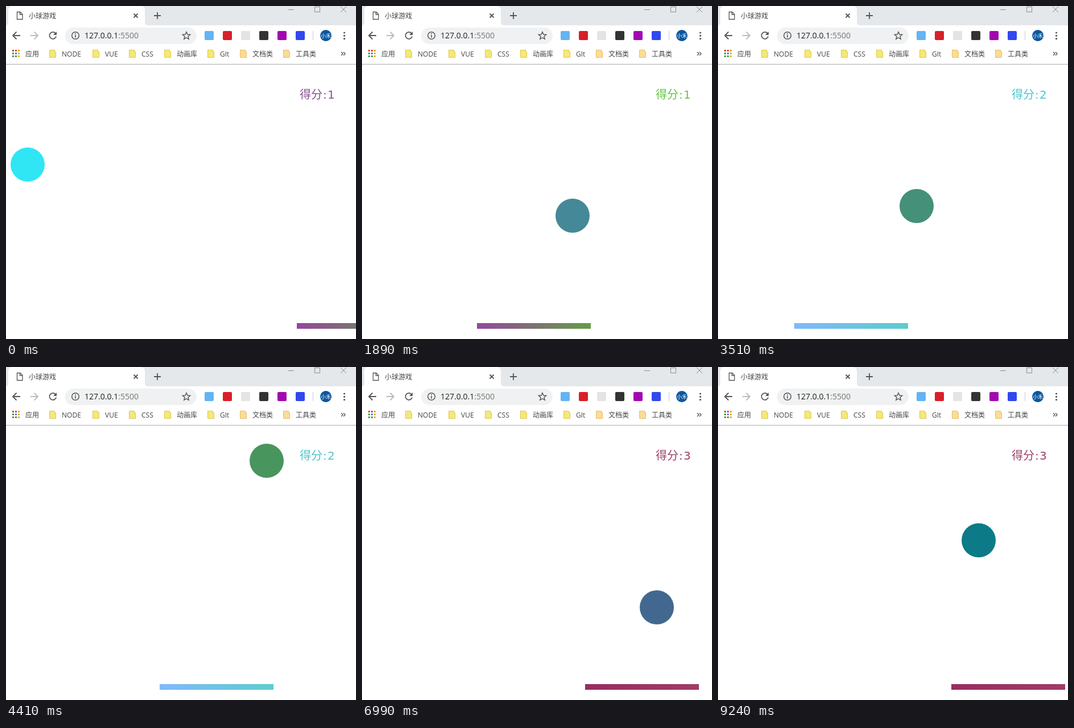
An HTML page that plays this animation: 615 px wide and 586 px high, repeating every 9270 ms.

```html
<!DOCTYPE html>
<html lang="zh-CN">
<head>
<meta charset="utf-8">
<title>小球游戏</title>
<style>
  html, body { margin: 0; width: 100%; height: 100%; overflow: hidden; background: #fff; }
  svg { display: block; width: 615px; height: 586px; }
  text { font-family: "Open Sans", "Noto Sans CJK SC", "Noto Sans CJK", sans-serif; font-size: 12px; fill: #444; }
  .line { fill: none; stroke: #555; stroke-width: 1.8; }
  .thin { fill: none; stroke: #8b8d8f; stroke-width: 1; }
  .score { font-family: "DejaVu Sans", "Noto Sans CJK SC", "Noto Sans CJK", sans-serif; font-size: 20px; }
</style>
</head>
<body>
<svg viewBox="0 0 615 586">
  <defs>
    <linearGradient id="paint"><stop id="from"/><stop id="to" offset="1"/></linearGradient>
    <clipPath id="page"><rect y="103" width="615" height="466"/></clipPath>
  </defs>
  <rect width="615" height="586" fill="#fff"/>

  <g clip-path="url(#page)">
    <rect id="paddle" y="558" width="200" height="10" fill="url(#paint)"/>
    <text id="score" class="score" y="163"><tspan x="516">得分</tspan><tspan x="557">:</tspan><tspan id="points" x="565"></tspan></text>
    <circle id="ball" r="30"/>
  </g>

  <!-- tab strip -->
  <rect width="615" height="34" fill="#e4e8eb"/>
  <path d="M0 34Q4 34 4 28V8Q4 0 12 0H236Q244 0 244 8V28Q244 34 250 34Z" fill="#fff"/>
  <path class="line" style="stroke-width:1.3" d="M19.5 10.5h5.5l4 4v9h-9.5zM24.5 10.5v4.5h4.5"/>
  <text x="40" y="21.5" fill="#555">小球游戏</text>
  <path class="line" d="M224.500 13.500l7 7m0-7l-7 7M260 17h12m-6-6v12"/>
  <path class="thin" d="M496 6.500h10M542.500 1.500h9v9h-9zM588 1l10 10m0-10l-10 10"/>

  <!-- toolbar -->
  <path class="line" d="M25 52H12m6.500-6.500L12 52l6.500 6.500"/>
  <path class="line" style="stroke:#bbb" d="M43 52h13m-6.500-6.500L56 52l-6.500 6.500"/>
  <path class="line" d="M87 48a6 6 0 1 0 1.200 5.500"/>
  <path d="M89 45v6h-6z" fill="#555"/>
  <rect x="104" y="38" width="231" height="29" rx="14.500" fill="#eff1f2"/>
  <circle class="line" cx="122" cy="52" r="6.300" style="stroke-width:1.500"/>
  <path class="line" d="M122 51v4.500M122 48v1.800" style="stroke-width:1.600"/>
  <text x="138" y="57" style="font-size:14px;fill:#222">127.0.0.1<tspan fill="#777">:5500</tspan></text>
  <path class="line" style="stroke-width:1.400" d="M317 45.500l1.900 4.500 4.800.4-3.700 3.100 1.200 4.700-4.200-2.500-4.200 2.500 1.200-4.700-3.700-3.100 4.800-.4z"/>
  <g id="extensions"></g>
  <path d="M539.500 44v16" stroke="#ccc"/>
  <circle cx="562" cy="52" r="10" fill="#0b57a0"/>
  <text x="562" y="55.500" text-anchor="middle" style="font-size:9px;fill:#fff">小禾</text>
  <g fill="#555"><circle cx="594.500" cy="47" r="1.600"/><circle cx="594.500" cy="52.300" r="1.600"/><circle cx="594.500" cy="57.600" r="1.600"/></g>

  <!-- bookmarks -->
  <g id="apps"></g>
  <text x="34" y="88.500">应用</text>
  <g id="bookmarks"></g>
  <path class="line" style="stroke-width:1.400" d="M589 81l3 3-3 3m4-6l3 3-3 3"/>
  <path d="M0 102.500H615" stroke="#a9abad"/>
</svg>
<script>
const LOOP = 9270, TICK = 30;
const $ = id => document.getElementById(id);

function add(parent, tag, attrs, text = "") {
  const node = document.createElementNS("http://www.w3.org/2000/svg", tag);
  for (const key in attrs) node.setAttribute(key, attrs[key]);
  node.textContent = text;
  $(parent).append(node);
}

["#62b4f4", "#d82028", "#e4e4e4", "#333", "#a208b0", "#3048ee"].forEach((fill, i) =>
  add("extensions", "rect", { x: 349 + 32 * i, y: 44, width: 16, height: 16, rx: 2, fill }));

["#e04030", "#e04030", "#e8a020", "#30a050", "#4080f0", "#e8b020", "#30a050", "#30a050", "#e8b020"].forEach((fill, i) =>
  add("apps", "rect", { x: 11 + i % 3 * 5, y: 77 + Math.floor(i / 3) * 5, width: 3, height: 3, fill }));

[[76, "NODE"], [152, "VUE"], [216, "CSS"], [278, "动画库"], [354, "GIt"], [411, "文档类"], [487, "工具类"]].forEach(([x, label], i) => {
  const [fill, stroke] = i < 5 ? ["#f5e878", "#dcc94c"] : ["#fbdc98", "#e8bc60"];
  add("bookmarks", "path", { d: `M${x + .5} 77.500h9v3h2v10h-11z`, fill, stroke });
  add("bookmarks", "text", { x: x + 22, y: 88.5 }, label);
});

// Tracks are [tick, value] pairs: positions run evenly between them, looks hold.
const ballX = [[0, 8], [38, 476], [44.9, 560], [86, 60], [90.9, 0], [124, 404], [136.5, 560], [147, 428],
  [155, 344], [182.8, 0], [188, 64], [227.3, 560], [233, 488], [248, 304], [273, 0], [279, 68], [308, 428]];
const ballY = [[0, 249], [24.1, 103], [38, 187], [86, 479], [88.7, 495], [124, 279], [147, 135], [152.7, 105],
  [155, 117], [188, 321], [216.3, 496], [233, 393], [248, 301], [280.6, 105], [308, 275]];
const paddleX = [[0, 511], [38, 284], [62, 210], [86, 27], [124, 158], [147, 270], [188, 4],
  [217, 320], [233, 392], [262, 418], [279, 410], [308, 410]];
const ballColor = [[0, "#30e6f4"], [25, "#1268c0"], [45, "#458898"], [89, "#449078"], [137, "#48955e"],
  [153, "#8a9846"], [183, "#cb9932"], [217, "#867f60"], [228, "#42688f"], [273, "#26728c"], [281, "#0d7a88"]];
const scoreColor = [[0, "#8a4c94"], [25, "#5cac40"], [45, "#64c444"], [89, "#4cc4cc"], [183, "#42cccc"], [217, "#9c3f6b"]];
const rounds = [[0, [1, "#94489c", "#649c48"]], [89, [2, "#80b8fc", "#5ccccc"]], [217, [3, "#982e60", "#a03c66"]]];

function glide(track, tick) {
  const i = Math.max(1, track.findIndex(([at]) => at >= tick));
  const [t0, a] = track[i - 1], [t1, b] = track[i];
  return Math.round(a + (b - a) * (tick - t0) / (t1 - t0));
}
const hold = (track, tick) => track.filter(([at]) => at <= tick).pop()[1];

function draw(time) {
  const tick = Math.floor(time % LOOP / TICK);
  const [points, from, to] = hold(rounds, tick);
  $("ball").setAttribute("cx", glide(ballX, tick) + 30);
  $("ball").setAttribute("cy", glide(ballY, tick) + 30);
  $("ball").setAttribute("fill", hold(ballColor, tick));
  $("paddle").setAttribute("x", glide(paddleX, tick));
  $("from").setAttribute("stop-color", from);
  $("to").setAttribute("stop-color", to);
  $("score").style.fill = hold(scoreColor, tick);
  $("points").textContent = points;
}

const start = performance.now();
function frame() {
  draw(performance.now() - start);
  requestAnimationFrame(frame);
}
frame();
</script>
</body>
</html>
```
